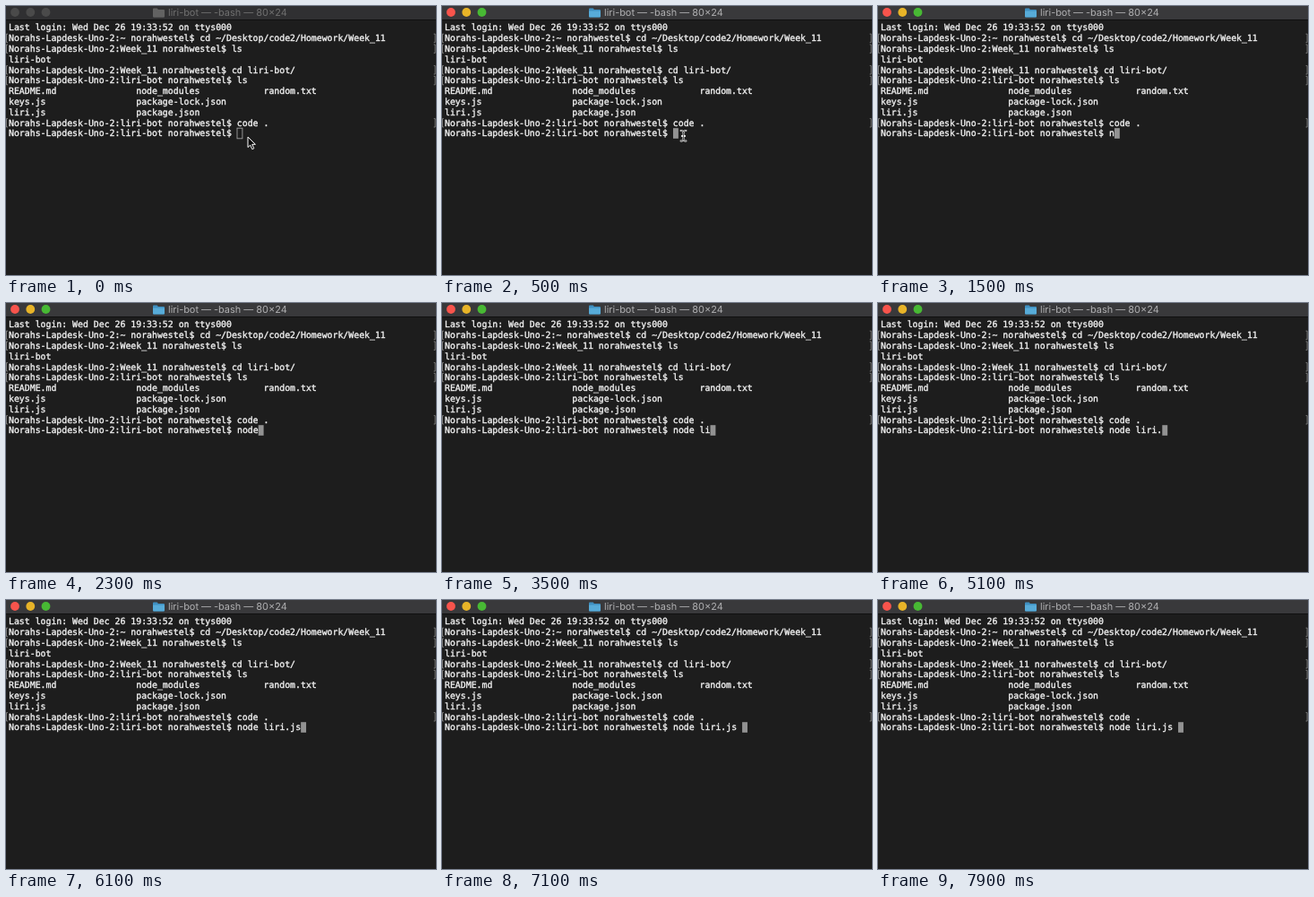
Recreate the animation shown at these times as an HTML page. Size 480 px wide and 300 px high, loop 8000 ms.

```html
<!DOCTYPE html>
<html lang="en">
<head>
<meta charset="utf-8">
<title>Terminal</title>
<style>
html, body { margin: 0; width: 100%; height: 100%; overflow: hidden; background: #1d1d1d; }
svg { display: block; width: 480px; height: 300px; }
text { white-space: pre; text-rendering: geometricPrecision; }
#rows text {
  font: 9.85px "DejaVu Sans Mono", monospace;
  fill: #f2f2f2; stroke: #f2f2f2; stroke-width: .36px;
}
.mark { fill: none; stroke: #858585; stroke-width: .9; }
.title { font: 10.93px Inter, sans-serif; fill: #b0b0b2; }
.bar { fill: #39393b; }
#caret { fill: #929292; stroke: none; }
.idle .bar { fill: #303032; }
.idle .title { fill: #707070; }
.idle .light { fill: #4a4a4a; }
.idle .folder path { fill: #626262; }
.idle #caret { fill: none; stroke: #a0a0a0; stroke-width: .9; }
.off { display: none; }
</style>
</head>
<body>
<svg id="stage" class="idle" viewBox="0 0 480 300">
  <rect width="480" height="300" fill="#1d1d1d"/>
  <rect class="bar" width="480" height="15"/>
  <rect y="15" width="480" height="1" fill="#111"/>
  <circle class="light" cx="10" cy="7" r="4.9" fill="#f8544c"/>
  <circle class="light" cx="27.3" cy="7" r="4.9" fill="#e8b428"/>
  <circle class="light" cx="44.5" cy="7" r="4.9" fill="#48b934"/>
  <g class="folder">
    <path d="M164 3.6q0-1 1-1h3.6l1.3 1.4h6.1q1 0 1 1v6.6q0 1-1 1h-11q-1 0-1-1z" fill="#3f8fc0"/>
    <path d="M164 5.4h13v6.2q0 1-1 1h-11q-1 0-1-1z" fill="#57abd8"/>
  </g>
  <text class="title" x="181" y="11">liri-bot — -bash — 80×24</text>
  <g id="rows"></g>
  <rect id="caret" y="136.2" width="5.9" height="11.6"/>
  <path id="arrow" d="M270 146v11.6l2.7-2.5 2.1 4.6 2-.9-2.1-4.5h3.7z"
    fill="#080808" stroke="#fff" stroke-width="1"/>
  <g id="beam" fill="none" stroke-linecap="round">
    <path d="M266.6 139q2.5 0 2.9 2q.4-2 2.9-2M269.5 141v7.6M267.9 145h3.2M266.6 150.6q2.5 0 2.9-2q.4 2 2.9 2"
      stroke="#eee" stroke-width="2"/>
    <path d="M266.8 139q2.3 0 2.7 2q.4-2 2.7-2M269.5 141v7.6M266.8 150.6q2.3 0 2.7-2q.4 2 2.7 2"
      stroke="#222" stroke-width=".7"/>
  </g>
</svg>
<script>
const LOOP = 8000, LEFT = 3, TOP = 27.4, PITCH = 11.8, CELL = 5.93;
const ACTIVE_AT = 100, BEAM_AT = 300;
const INPUT = "node liri.js ";
const KEY_TIMES = [1500, 1700, 1900, 2100, 2700, 3100, 3300, 3900, 4100, 4900, 5500, 5900, 6900];

const $ = id => document.getElementById(id);
const rows = $("rows");

function add(tag, attrs, content = "") {
  const el = document.createElementNS("http://www.w3.org/2000/svg", tag);
  for (const key in attrs) el.setAttribute(key, attrs[key]);
  el.textContent = content;
  return rows.appendChild(el);
}

const prompt = dir => `Norahs-Lapdesk-Uno-2:${dir} norahwestel$ `;
const columns = (...names) => names.map(n => n.padEnd(24)).join("").trimEnd();

const lines = [
  "Last login: Wed Dec 26 19:33:52 on ttys000",
  prompt("~") + "cd ~/Desktop/code2/Homework/Week_11",
  prompt("Week_11") + "ls",
  "liri-bot",
  prompt("Week_11") + "cd liri-bot/",
  prompt("liri-bot") + "ls",
  columns("README.md", "node_modules", "random.txt"),
  columns("keys.js", "package-lock.json"),
  columns("liri.js", "package.json"),
  prompt("liri-bot") + "code .",
  prompt("liri-bot")
];

const last = lines.length - 1;
lines.forEach((line, i) => {
  const y = TOP + i * PITCH;
  add("text", { x: LEFT, y }, line);
  if (i < last && line.includes("$ ")) {
    add("path", { class: "mark", d: `M2 ${y - 8}H.5v9.4H2M477.6 ${y - 8}h1.5v9.4h-1.5` });
  }
});

const inputX = LEFT + lines[last].length * CELL;
const typed = add("text", { x: inputX, y: TOP + last * PITCH });

function draw(now) {
  const t = now % LOOP;
  const count = KEY_TIMES.filter(k => k <= t).length;
  typed.textContent = INPUT.slice(0, count);
  $("caret").setAttribute("x", inputX + count * CELL);
  $("stage").classList.toggle("idle", t < ACTIVE_AT);
  $("arrow").classList.toggle("off", t >= BEAM_AT);
  $("beam").classList.toggle("off", t < BEAM_AT || count > 0);
}

let start;
function tick(now) {
  start ??= now;
  draw(now - start);
  requestAnimationFrame(tick);
}
draw(0);
requestAnimationFrame(tick);
</script>
</body>
</html>
```
